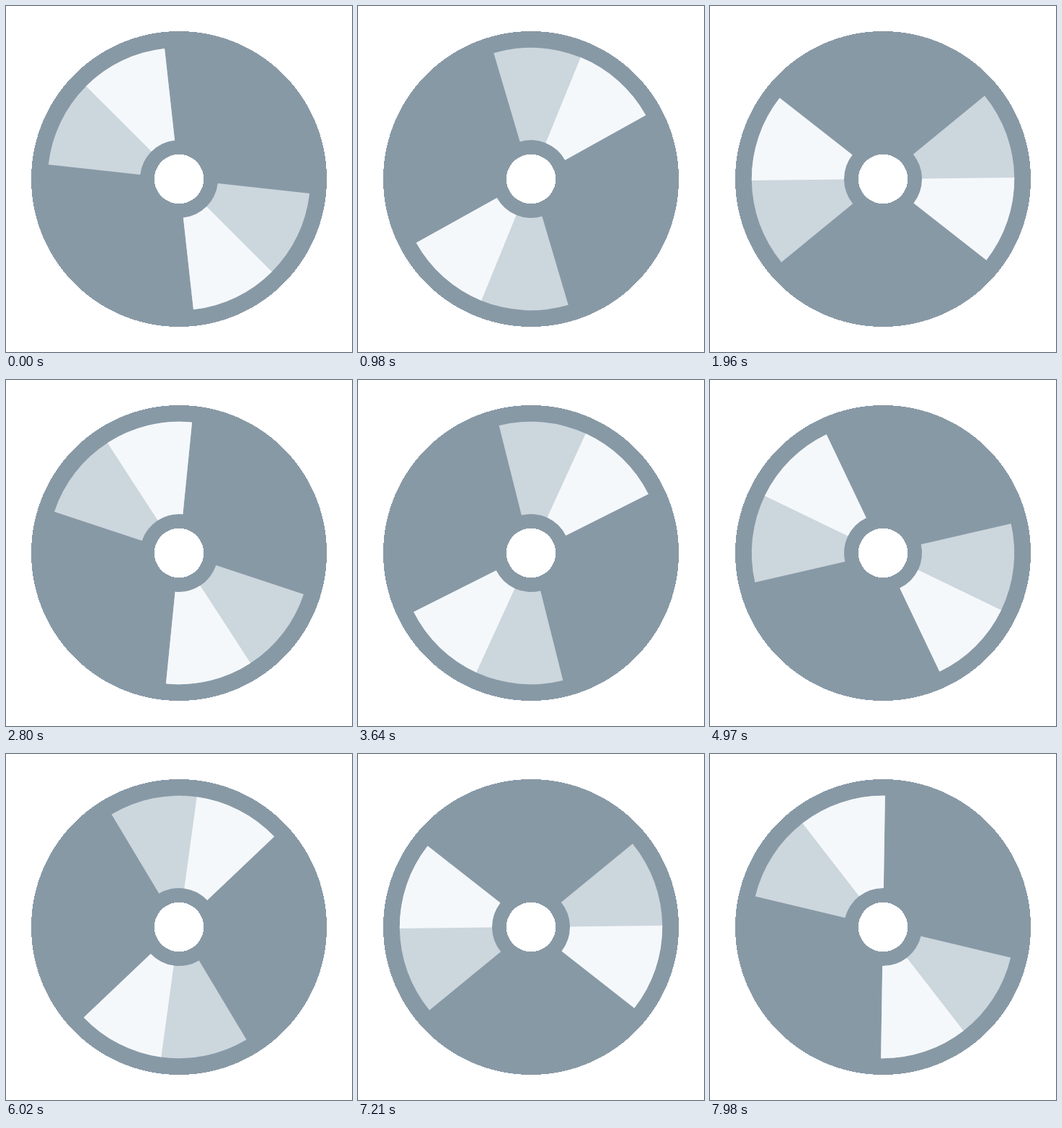
Recreate the animation shown at these times as an HTML page with a canvas. Size 480x480 px, loop 8000 ms.

```html
<!DOCTYPE html>
<html lang="en">
<head>
<meta charset="utf-8">
<title>Spinning disc</title>
<style>
  html, body { margin: 0; width: 100%; height: 100%; overflow: hidden; background: #fff; }
  canvas { display: block; width: 480px; height: 480px; }
</style>
</head>
<body>
<canvas id="stage" width="480" height="480"></canvas>
<script>
const ctx = document.getElementById('stage').getContext('2d');
const LOOP = 8000, STEP = 70, STEPS_PER_TURN = 75;
const CENTER = 240, DISC = 205, HOLE = 34.2, INNER = 54.1, OUTER = 182.2;
const RAD = Math.PI / 180, SPAN = 38.7 * RAD;

// Hard-edged circle, filled row by row
function crispCircle(r, color) {
  ctx.fillStyle = color;
  for (let y = Math.floor(CENTER - r); y < CENTER + r; y++) {
    const dy = y + 0.5 - CENTER;
    if (Math.abs(dy) >= r) continue;
    const half = Math.round(Math.sqrt(r * r - dy * dy));
    ctx.fillRect(CENTER - half, y, half * 2, 1);
  }
}

function wedge(from, to, color) {
  ctx.beginPath();
  ctx.arc(CENTER, CENTER, OUTER, from, to);
  ctx.arc(CENTER, CENTER, INNER, to, from, true);
  ctx.closePath();
  ctx.fillStyle = color;
  ctx.fill();
}

function draw(time) {
  const step = Math.floor((time % LOOP) / STEP);
  const angle = (45 + step * 360 / STEPS_PER_TURN) * RAD;
  ctx.fillStyle = '#fff';
  ctx.fillRect(0, 0, 480, 480);
  crispCircle(DISC, '#8899a6');
  for (const a of [angle, angle + Math.PI]) {
    wedge(a - SPAN, a + SPAN, '#ccd6dd');
    wedge(a, a + SPAN, '#f5f8fa');
  }
  crispCircle(HOLE, '#fff');
}

const start = performance.now();
function tick() {
  draw(performance.now() - start);
  requestAnimationFrame(tick);
}
tick();
</script>
</body>
</html>
```
